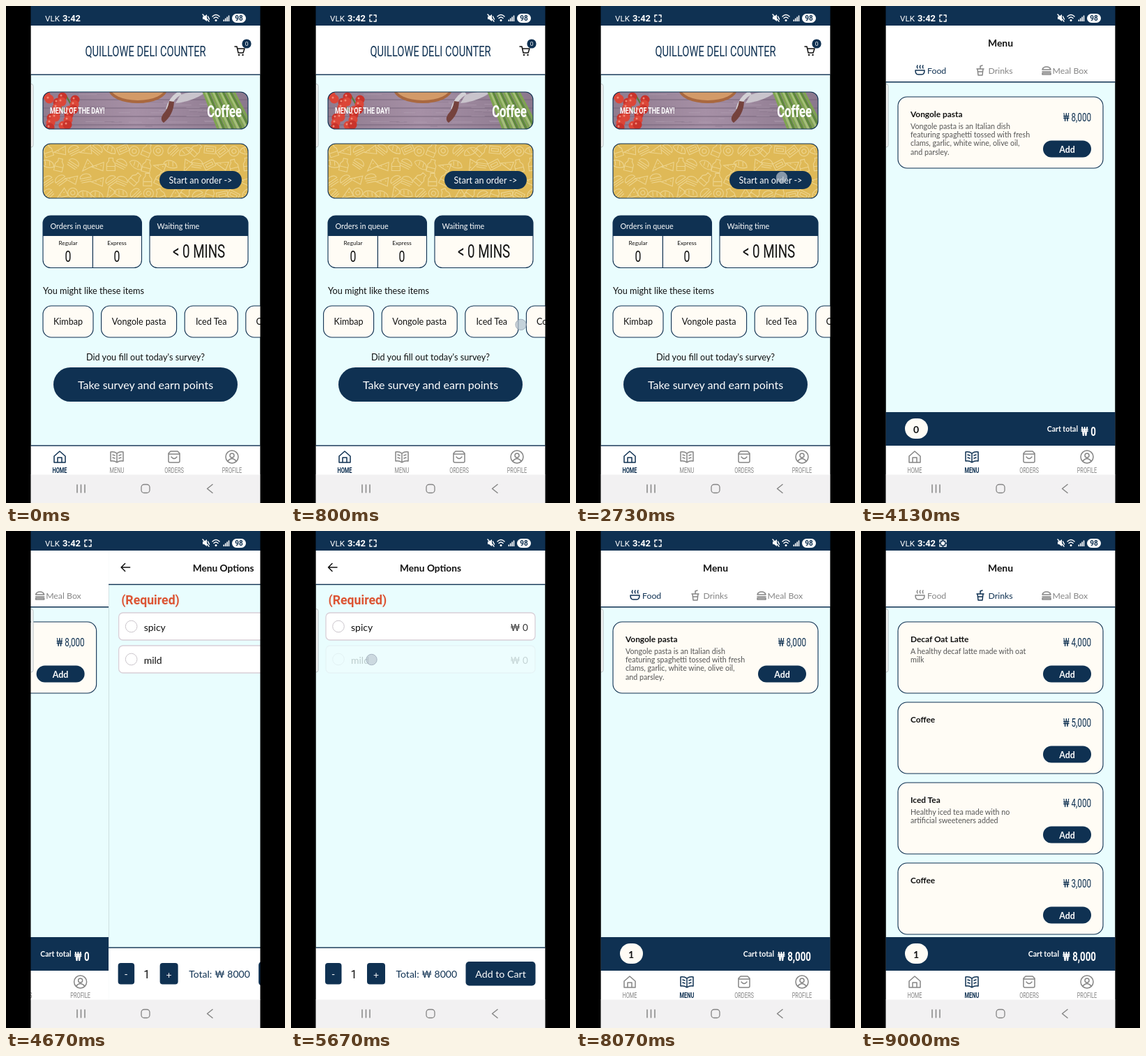
An HTML page for the animation above (9070 ms loop, 400x711 px).

```html
<!DOCTYPE html>
<html lang="en">
<head>
<meta charset="utf-8">
<style>
html, body { margin: 0; width: 100%; height: 100%; overflow: hidden; background: #000; }
svg { display: block; width: 100%; height: 100%; font-family: Lato, "Noto Sans CJK KR", "Noto Sans", sans-serif; }
.line { fill: none; stroke: currentColor; stroke-width: 1.5; stroke-linecap: round; stroke-linejoin: round; }
.narrow { font-family: Roboto, "Noto Sans CJK KR", sans-serif; }
.system { font-family: Roboto, sans-serif; }
</style>
</head>
<body>
<svg id="stage" viewBox="0 0 400 711"></svg>
<script>
const LOOP = 9070, WIDTH = 329;
const NAVY = '#0f3152', CREAM = '#fffcf5', SKY = '#e9fdfe', GREY = '#858585', INK = '#111';
const TAU = Math.PI * 2;

let seed = 11;
const random = () => (seed = seed * 16807 % 2147483647) / 2147483647;
const times = (n, make) => Array.from({ length: n }, (_, i) => make(i)).join('');

const box = (x, y, w, h, fill, radius = 0, extra = '') =>
  `<rect x="${x}" y="${y}" width="${w}" height="${h}" rx="${radius}" fill="${fill}" ${extra}/>`;
const disc = (x, y, r, fill, extra = '') => `<circle cx="${x}" cy="${y}" r="${r}" fill="${fill}" ${extra}/>`;
const line = (d, color = NAVY, extra = '') => `<path class="line" d="${d}" style="color:${color}" ${extra}/>`;
const group = (id, body, extra = '') => `<g id="${id}" ${extra}>${body}</g>`;

function text(x, y, size, body, { fill = INK, anchor = 'start', weight = 400, face = '' } = {}) {
  return `<text x="${x}" y="${y}" font-size="${size}" fill="${fill}" text-anchor="${anchor}" font-weight="${weight}" class="${face}">${body}</text>`;
}
// One condensed face, used for headings, prices and tab labels.
const narrow = (x, y, size, body, style = {}) =>
  `<g transform="translate(${x} ${y}) scale(.72 1)">${text(0, 0, size, body, { fill: NAVY, ...style, face: 'narrow' })}</g>`;
const outline = `stroke="${NAVY}" stroke-width="1.1"`;

function photo() {
  const planks = times(4, i => `<path d="M53 ${134 + i * 12}H347" stroke="#79677c" stroke-width="1"/>`);
  const grain = times(34, () => {
    const x = 95 + random() * 190, y = 124 + random() * 52;
    return `<path d="M${x} ${y}h${8 + random() * 22}" stroke="${random() < .5 ? '#b7a5b8' : '#877489'}" stroke-width=".8" opacity=".6"/>`;
  });
  const tomatoes = times(19, i => {
    const x = 57 + i * 17 % 43, y = 127 + i * 11 % 48;
    return disc(x, y, 6.5, i % 2 ? '#c9332b' : '#dc4638') + disc(x - 2, y - 2, 1.5, '#f08a78');
  });
  const stalks = times(13, i =>
    `<path d="M${283 + i * 3.6} ${122 + i % 3}L${305 + i * 4.2} 178" stroke="${['#7fa450', '#a5c077', '#5f8a3c'][i % 3]}" stroke-width="3.4" stroke-linecap="round"/>`);
  return `<g clip-path="url(#photoClip)">${box(53, 123, 294, 54, 'url(#wood)')}${planks}${grain}
    <ellipse cx="189" cy="119" rx="42" ry="20" fill="#a9683f"/><ellipse cx="189" cy="116" rx="40" ry="19" fill="#d39a68"/>
    <path d="M250 124Q236 132 232 148" fill="none" stroke="#d3d0d5" stroke-width="6"/>
    <path d="M241 137Q240 156 226 167Q220 163 225 155Q232 148 234 136Z" fill="#75423d"/>
    <path d="M250 127Q260 123 288 121L281 127Q264 137 243 139Z" fill="#c9c4cc"/>
    <path d="M86 128l6 11 10-8M68 150l9-8 7 9" fill="none" stroke="#557b38" stroke-width="2"/>
    ${tomatoes}${stalks}</g>${box(53, 123, 294, 53, 'none', 11, outline)}`;
}

function doodles() {
  const shapes = [
    'M-8 5L6-7 9 5ZM-3 2h2M3-1h2',
    'M-8-5h16v10h-16zM-5-2h10v4h-10z',
    'M-3-9h6v4l3 4v10h-12v-10l3-4zM-6 3h12',
    'M-8 0a8 6 0 0 1 16 0zM-8 3h16M-7 6h14',
    'M-7 0a7 7 0 1 0 14 0a7 7 0 1 0-14 0M-3 0a3 3 0 1 0 6 0a3 3 0 1 0-6 0',
    'M-10 2Q-8-5 0-5T10 2Q0 8-10 2M-4-3l2 6M2-4l2 6'
  ];
  const marks = times(68, i => {
    const x = 58 + i % 17 * 17.8 + random() * 4, y = 204 + Math.floor(i / 17) * 21 + random() * 4;
    return `<path d="${shapes[Math.floor(random() * 6)]}" transform="translate(${x} ${y}) rotate(${random() * 90 - 45})"/>`;
  });
  return `<g clip-path="url(#orderClip)">${box(53, 197, 294, 78, '#dfb957')}
    <g fill="none" stroke="#edd48e" stroke-width="1.1">${marks}</g></g>${box(53, 197, 294, 78, 'none', 11, outline)}`;
}

function nav(active) {
  const items = [
    ['HOME', 77, 'M-8-1L0-8 8-1V8H-8ZM-3 8V1H3V8'],
    ['MENU', 159, 'M0-5Q-4-8-9-7V6Q-4 5 0 8Q4 5 9 6V-7Q4-8 0-5V8M-6-3l3 1M-6 1l3 1M6-3l-3 1M6 1l-3 1'],
    ['ORDERS', 241, 'M-8-5L-5-8H5L8-5V6Q8 8 6 8H-6Q-8 8-8 6ZM-8-4H8M-4 0Q0 5 4 0'],
    ['PROFILE', 324, 'M-9 0a9 9 0 1 0 18 0a9 9 0 1 0-18 0M-3-2a3 3 0 1 0 6 0a3 3 0 1 0-6 0M-6 6Q0-1 6 6']
  ];
  return box(35.5, 629, WIDTH, 42, '#fff') + items.map(([label, x, d], i) => {
    const on = i === active, fill = on ? NAVY : GREY;
    return line(d, fill, `transform="translate(${x} 645)" ${on ? 'style="stroke-width:2"' : ''}`) +
      narrow(x, 667.5, 10.3, label, { fill, anchor: 'middle', weight: on ? 700 : 400 });
  }).join('');
}

function home() {
  let x = 53;
  const chips = [['Kimbap', 72], ['Vongole pasta', 108], ['Iced Tea', 76], ['Coffee', 66], ['Burger', 70], ['Salad', 66]]
    .map(([name, w]) => {
      const chip = box(x, 429, w, 45, CREAM, 12, outline) + text(x + w / 2, 456, 12.6, name, { anchor: 'middle' });
      x += w + 11.6;
      return chip;
    }).join('');
  const panel = (px, w, label) => box(px, 300, w, 74.5, CREAM, 11) +
    `<path d="M${px} 329V311a11 11 0 0 1 11-11H${px + w - 11}a11 11 0 0 1 11 11V329Z" fill="${NAVY}"/>` +
    box(px, 300, w, 74.5, 'none', 11, outline) + text(px + 10.5, 319, 10.8, label, { fill: '#fff' });
  const mid = { anchor: 'middle' };
  return box(35.5, 28, WIDTH, 643, SKY) + box(35.5, 28, WIDTH, 70, '#fff') + box(35.5, 97.5, WIDTH, 1.4, NAVY) +
    narrow(200, 71.5, 20.4, 'QUILLOWE DELI COUNTER', mid) +
    line('M328 58h3l2 9h7l2-6h-10', INK) + disc(334, 70, 1.2, INK) + disc(339.5, 70, 1.2, INK) +
    disc(345, 54, 6.6, NAVY) + text(345, 57, 8, '0', { fill: '#fff', ...mid }) +
    photo() + narrow(63, 154, 12.4, 'MENU OF THE DAY!', { fill: '#fff', weight: 700 }) +
    narrow(338, 158.5, 23, 'Coffee', { fill: '#fff', weight: 700, anchor: 'end' }) +
    doodles() + box(220, 236, 118, 26, NAVY, 13) + text(279, 253.5, 12.6, 'Start an order -&gt;', { fill: '#fff', ...mid }) +
    panel(53, 141.5, 'Orders in queue') + panel(206, 141, 'Waiting time') +
    box(123.8, 329, 1.2, 45, NAVY) + text(89, 342, 8.2, 'Regular', mid) + text(159, 342, 8.2, 'Express', mid) +
    narrow(89, 366, 22, '0', { fill: INK, ...mid }) + narrow(159, 366, 22, '0', { fill: INK, ...mid }) +
    narrow(276.5, 360, 26, '&lt; 0 MINS', { fill: INK, ...mid }) +
    text(53, 412, 12.7, 'You might like these items') + group('chips', chips) +
    text(200, 507, 12.7, 'Did you fill out today\'s survey?', mid) +
    box(68, 517, 264, 49, NAVY, 24.5) + text(200, 548, 16, 'Take survey and earn points', { fill: '#fff', ...mid }) +
    nav(0) + box(35.5, 628.2, WIDTH, 1.4, NAVY);
}

const card = (y, [name, price, ...notes]) => box(53, y, 294, 102, CREAM, 13, outline) +
  text(71, y + 29, 11.9, name, { weight: 700 }) +
  notes.map((note, i) => text(71, y + 46 + i * 12.2, 10.7, note, { fill: '#555' })).join('') +
  narrow(330, y + 34.5, 16.2, '₩ ' + price, { anchor: 'end' }) +
  box(261, y + 62.5, 69, 24, NAVY, 12) + text(295.5, y + 79.5, 12.4, 'Add', { fill: '#fff', weight: 700, anchor: 'middle' });

function tabs(active) {
  const color = i => i === active ? NAVY : GREY;
  return line('M78 92H91Q91 98 87 98H82Q78 98 78 92M81 89q-1.500-2 0-4M85 89q-1.500-2 0-4M89 89q-1.500-2 0-4', color(0)) +
    text(95, 97, 12.3, 'Food', { fill: color(0) }) +
    line('M166 90H176M167 90L168 99H174L175 90M171 90V86L174 85M168 94H174', color(1)) +
    text(182.5, 97, 12.3, 'Drinks', { fill: color(1) }) +
    line('M260 91Q261 87 266 87T272 91ZM260 94H272M260 96H272V98H260Z', color(2)) +
    text(274.5, 97, 12.3, 'Meal Box', { fill: color(2) });
}

const cart = (count, price, labelEnd) => text(79, 610.5, 14, count, { weight: 700, anchor: 'middle' }) +
  text(labelEnd, 609, 10.5, 'Cart total', { fill: '#fff', weight: 700, anchor: 'end' }) +
  narrow(337, 614.5, 18.5, price, { fill: '#fff', weight: 700, anchor: 'end' });

function menu() {
  const food = card(130, ['Vongole pasta', '8,000', 'Vongole pasta is an Italian dish',
    'featuring spaghetti tossed with fresh', 'clams, garlic, white wine, olive oil,', 'and parsley.']);
  const drinks = [
    ['Decaf Oat Latte', '4,000', 'A healthy decaf latte made with oat', 'milk'],
    ['Coffee', '5,000'],
    ['Iced Tea', '4,000', 'Healthy iced tea made with no', 'artificial sweeteners added'],
    ['Coffee', '3,000']
  ].map((item, i) => card(130 + i * 115, item)).join('');
  return box(35.5, 28, WIDTH, 643, SKY) + box(35.5, 28, WIDTH, 80, '#fff') + box(35.5, 108, WIDTH, 1.5, NAVY) +
    text(200, 57.5, 13.9, 'Menu', { weight: 700, anchor: 'middle' }) +
    group('food', tabs(0) + food) + group('drinks', tabs(1) + drinks) +
    box(35.5, 581, WIDTH, 48, NAVY) + box(63, 590, 33, 29, CREAM, 14.5) +
    group('cartEmpty', cart('0', '₩ 0', 311)) + group('cartFull', cart('1', '₩ 8,000', 284)) + nav(1);
}

function options() {
  const row = (y, name) => box(50, y, 300, 39, '#fff', 6, 'stroke="#d9d0d8" stroke-width="1.3"') +
    disc(68, y + 19.5, 8.3, '#fff', 'stroke="#cbc6cc"') + text(86, y + 25.5, 14, name) +
    text(340, y + 25.5, 13.6, '₩ 0', { fill: '#333', anchor: 'end' });
  const label = { fill: '#fff', anchor: 'middle' };
  return box(35.5, 28, WIDTH, 643, SKY) + box(35.5, 28, WIDTH, 48, '#fff') + box(35.5, 75.8, WIDTH, 1.4, NAVY) +
    line('M66 52H54M59 46.500L53.500 52L59 57.500', INK, 'style="stroke-width:1.8"') +
    text(200, 57.5, 13.7, 'Menu Options', { weight: 700, anchor: 'middle' }) +
    text(53.5, 105, 17.7, '(Required)', { fill: '#dc5534', weight: 700, face: 'system' }) +
    row(117, 'spicy') + group('mild', row(164, 'mild') + group('picked', disc(68, 183.5, 4.8, NAVY))) +
    box(35.5, 596, WIDTH, 75, '#fff') + box(35.5, 595.3, WIDTH, 1.4, NAVY) +
    box(49, 618, 23.5, 30.5, NAVY, 4) + box(109, 618, 26, 30.5, NAVY, 4) +
    text(60.5, 639, 14, '-', label) + text(122, 639.5, 14, '+', label) +
    text(90, 640, 16, '1', { anchor: 'middle', face: 'system' }) +
    text(150.5, 639, 14, 'Total: ₩ 8000', { fill: NAVY }) +
    group('addToCart', box(250.5, 616, 100, 34.5, NAVY, 5) + text(300.5, 639, 14.2, 'Add to Cart', label));
}

function chrome() {
  const white = '#fff';
  const bars = times(4, i => box(311.5 + i * 2.4, 19.5 - i * 2, 1.6, 2.5 + i * 2, white));
  return box(0, 0, 35.5, 711, '#000') + box(364.5, 0, 35.5, 711, '#000') + box(35.5, 0, WIDTH, 28, NAVY) +
    text(56, 21.5, 11.6, 'VLK', { fill: white, face: 'system' }) +
    text(81, 21.5, 13, '3:42', { fill: white, weight: 700, face: 'system' }) +
    group('capture', line('M113 16V13H116M119 13H122V16M122 19V22H119M116 22H113V19', white, 'style="stroke-width:1.3"') +
      group('captureFill', disc(117.5, 17.5, 2.7, white))) +
    `<path d="M282 15h2l4-3v10l-4-3h-2Z" fill="#fff"/>` + line('M282 12L291 22M289.500 15l2 4', white, 'style="stroke-width:1.1"') +
    line('M296 15Q301 10 306 15M298 17.500Q301 14.500 304 17.500', white) + disc(301, 20.5, 1.5, white) + bars +
    box(324, 11, 20, 13, white, 6.5) + text(334, 21.4, 10, '98', { fill: NAVY, weight: 700, anchor: 'middle', face: 'system' }) +
    box(35.5, 670.5, WIDTH, 41, '#f2f1f2') +
    line('M102 685V696M107.500 685V696M113 685V696', '#858585', 'style="stroke-width:1.2"') +
    box(194, 684.5, 12, 12, 'none', 4, 'stroke="#858585" stroke-width="1.3"') +
    line('M296 684.500L288.500 690.500L296 696.500', '#858585', 'style="stroke-width:1.2"') +
    `<path d="M36 111.500q3 0 3 3V199q0 3-3 3" fill="#f5f7f7" stroke="#b9c1c3" stroke-width="1"/>`;
}

const stage = document.getElementById('stage');
stage.innerHTML = `<defs>
  <linearGradient id="wood"><stop stop-color="#8f7b8e"/><stop offset=".45" stop-color="#a690a6"/><stop offset="1" stop-color="#8b788d"/></linearGradient>
  <clipPath id="photoClip">${box(53, 123, 294, 53, '#000', 11)}</clipPath>
  <clipPath id="orderClip">${box(53, 197, 294, 78, '#000', 11)}</clipPath></defs>` +
  box(0, 0, 400, 711, '#000') + group('home', home()) + group('menu', menu()) + group('options', options()) +
  chrome() + disc(0, 0, 7.7, '#b5c1cc', 'id="touch" fill-opacity=".72" stroke="#8f9cac" stroke-width=".8"');

const parts = Object.fromEntries([...stage.querySelectorAll('g[id], #touch')].map(el => [el.id, el]));
const show = (id, on) => { parts[id].style.display = on ? '' : 'none'; };
const move = (id, x, y = 0) => parts[id].setAttribute('transform', `translate(${x} ${y})`);
const fade = (id, alpha) => parts[id].setAttribute('opacity', alpha);
const progress = (t, start, length) => Math.min(1, Math.max(0, (t - start) / length));
const smooth = p => (1 - Math.cos(p * TAU / 2)) / 2;
const easeOut = p => 1 - (1 - p) ** 3;
const pressed = (t, start, end) => 1 - .8 * progress(t, start, 100) * (1 - progress(t, end, 180));

// start, end, from x, from y, to x, to y
const touches = [
  [650, 1490, 336, 455, 254, 466],
  [1800, 2250, 200, 466, 282, 460],
  [2580, 2780, 295, 245, 295, 245],
  [4320, 4470, 298, 204, 298, 204],
  [5430, 5640, 115.5, 184, 115.5, 184],
  [6440, 6630, 312, 630, 312, 630],
  [8100, 8280, 192, 93, 192, 93]
];

function render(t) {
  const scroll = smooth(progress(t, 650, 840)) - smooth(progress(t, 1800, 450));
  const push = easeOut(progress(t, 4550, 400)) - easeOut(progress(t, 6800, 440));
  show('home', t < 2800);
  show('menu', t >= 2800 && push < 1);
  show('options', push > 0);
  move('chips', -82.5 * scroll);
  move('menu', -WIDTH * push);
  move('options', WIDTH * (1 - push));

  show('food', t < 8330);
  show('drinks', t >= 8330);
  show('cartEmpty', t < 6700);
  show('cartFull', t >= 6700);
  show('picked', t >= 5700);
  fade('mild', pressed(t, 5480, 5700));
  fade('addToCart', pressed(t, 6560, 6680));

  show('capture', t >= 300);
  show('captureFill', t % 1850 > 1240);

  const touch = touches.find(([start, end]) => t >= start && t < end + 200);
  show('touch', touch);
  if (touch) {
    const [start, end, x0, y0, x1, y1] = touch;
    const p = smooth(progress(t, start, end - start));
    move('touch', x0 + (x1 - x0) * p, y0 + (y1 - y0) * p);
    fade('touch', progress(t, start - 30, 90) * (1 - progress(t, end, 200)));
  }
}

const began = performance.now();
function tick() {
  render((performance.now() - began) % LOOP);
  requestAnimationFrame(tick);
}
tick();
</script>
</body>
</html>
```
